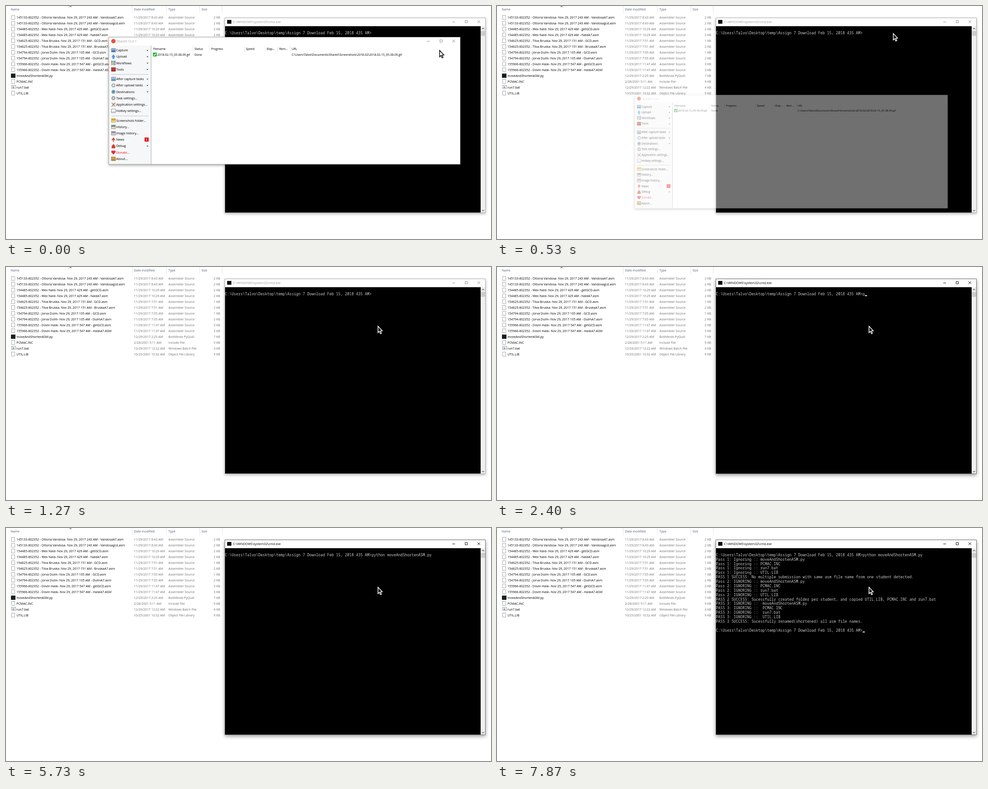
Animation of 1078 by 519 pixels, one loop 8 s. Source, as an HTML page with a canvas:

```html
<!DOCTYPE html>
<html lang="en">
<head>
<meta charset="utf-8">
<title>Console run</title>
<style>
html, body { margin: 0; width: 100%; height: 100%; overflow: hidden; background: #fff; }
canvas { display: block; }
</style>
</head>
<body>
<canvas id="stage" width="1078" height="519"></canvas>
<script>
const W = 1078, H = 519, LOOP = 8000, TICK = 200 / 3;
const UI = '"Open Sans", "Noto Sans", sans-serif';
const MONO = '"Noto Sans Mono", "DejaVu Sans Mono", monospace';
const stage = document.getElementById('stage').getContext('2d');
const clamp = v => Math.max(0, Math.min(1, v));

// Drawing helpers

// Text is set large and scaled down so that advances stay fractional.
function text(g, s, x, y, { size = 6.95, color = '#000', font = UI, align = 'left' } = {}) {
  g.save();
  g.translate(x, y);
  g.scale(size / 100, size / 100);
  g.font = `100px ${font}`;
  g.textAlign = align;
  g.fillStyle = color;
  g.fillText(s, 0, 0);
  g.restore();
}

function box(g, color, x, y, w, h) {
  g.fillStyle = color;
  g.fillRect(x, y, w, h);
}

function frame(g, color, x, y, w, h, width = .9) {
  g.strokeStyle = color;
  g.lineWidth = width;
  g.strokeRect(x, y, w, h);
}

function trace(g, pts) {
  g.beginPath();
  for (let i = 0; i < pts.length; i += 2) g.lineTo(pts[i], pts[i + 1]);
}

function poly(g, color, ...pts) {
  trace(g, pts);
  g.fillStyle = color;
  g.fill();
}

function line(g, color, width, ...pts) {
  trace(g, pts);
  g.strokeStyle = color;
  g.lineWidth = width;
  g.stroke();
}

function disc(g, color, x, y, r) {
  g.beginPath();
  g.arc(x, y, r, 0, Math.PI * 2);
  g.fillStyle = color;
  g.fill();
}

function chevron(g, color, x, y, dir) {
  line(g, color, 1.1, x - 2.4, y + dir, x, y - dir, x + 2.4, y + dir);
}

function panel(g, { x, y, w, h }, blur, shade, border) {
  g.save();
  g.shadowColor = `rgba(0,0,0,${shade})`;
  g.shadowBlur = blur;
  g.shadowOffsetY = blur / 3;
  box(g, '#fff', x, y, w, h);
  g.restore();
  frame(g, border, x + .5, y + .5, w - 1, h - 1, 1);
}

function captionButtons(g, x, y, color) {
  line(g, color, 1, x - 3, y + .5, x + 3, y + .5);
  frame(g, color, x + 25.5, y - 2.5, 5, 5);
  for (const d of [-3, 3]) line(g, color, .9, x + 56 - d, y - 3, x + 56 + d, y + 3);
}

// File list

const SCRIPT = 'moveAndShortenASM.py';
const SUBMISSIONS = `
145133|Ottoria Vandosa|243|8:43|VandosaA7.asm|2
145133|Ottoria Vandosa|243|8:43|Vandosagcd.asm|2
154485|Wex Nald|429|10:29|getGCD.asm|2
154485|Wex Nald|429|10:29|NaldA7.asm|2
154625|Tilva Bruska|151|7:51|GCD.asm|1
154625|Tilva Bruska|151|7:51|BruskaA7.asm|2
154794|Jorva Dulm|105|7:05|GCD.asm|1
154794|Jorva Dulm|105|7:05|DulmA7.asm|2
155966|Dovin Hask|547|11:47|getGCD.asm|3
155966|Dovin Hask|547|11:47|HaskA7.ASM|3`;
const TOOLS = `
${SCRIPT}|12/29/2017 2:25 AM|BoltMinds PyQuill|7
PCMAC.INC|2/28/2001 5:11 AM|Include File|9
run7.bat|12/29/2017 12:22 AM|Windows Batch File|4
UTIL.LIB|10/25/2001 10:32 AM|Object File Library|9`;
const rows = s => s.trim().split('\n').map(r => r.split('|'));
const FILES = rows(SUBMISSIONS).map(([id, name, stamp, time, file, size]) => [
  `${id}-602352 - ${name}- Nov 29, 2017 ${stamp} AM - ${file}`,
  `11/29/2017 ${time} AM`, 'Assembler Source', size
]).concat(rows(TOOLS));

function fileIcon(g, name, x, y) {
  if (name === SCRIPT) return box(g, '#15201c', x - 1.5, y, 10, 9.5);
  const bat = name === 'run7.bat';
  const w = bat ? 9 : 7, h = bat ? 7.5 : 9;
  box(g, bat ? '#eef2f5' : '#fff', x, y, w, h);
  frame(g, '#8f8f8f', x, y, w, h, .8);
  if (bat) disc(g, '#8fa3b4', x + 4, y + 4.5, 2);
}

function drawExplorer(g) {
  const head = { color: '#4c607a' }, dim = { color: '#6d6d6d' };
  const heads = { Name: 10.5, 'Date modified': 284.5, Type: 361, Size: 434.5 };
  for (const s in heads) text(g, s, heads[s], 10.4, head);
  for (const x of [280, 356, 430, 480]) box(g, '#e5e5e5', x, 0, 1, 16);
  chevron(g, '#777', 143.4, 1.4, 1);
  FILES.forEach(([name, date, type, size], i) => {
    const y = 25.7 + i * 12.95, base = y + 2.5;
    fileIcon(g, name, 12.5, y - 4.7);
    text(g, name, 23.3, base);
    text(g, date, 284.3, base, dim);
    text(g, type, 361, base, dim);
    text(g, size + ' KB', 476, base, { ...dim, align: 'right' });
  });
}

// Capture tool: menu icons live in a 10 by 10 cell

const card = (top, bottom, edge = '#7c8a96') => g => {
  box(g, top, .5, 1, 9, 4);
  box(g, bottom, .5, 5, 9, 4);
  frame(g, edge, .5, 1, 9, 8);
};
const peak = (color, stem) => g => {
  poly(g, color, 5, 0, 9.5, 6, .5, 6);
  box(g, color, 5 - stem, 6, stem * 2, 4);
};
const ring = (color, core) => g => {
  disc(g, color, 5, 5, 4.4);
  disc(g, core, 5, 5, 2.2);
};
const grid = g => {
  for (let i = 0; i < 9; i++)
    box(g, `hsl(${i * 120 % 360 + i * 5},55%,55%)`, i % 3 * 3.4, (i / 3 | 0) * 3.4, 2.7, 2.7);
};
const cross = g => {
  line(g, '#8a8a8a', 1.6, 1, 1, 9.5, 9.5);
  line(g, '#b25a4a', 1.6, 9, 1, 1, 9.5);
};
const heart = g => {
  for (const x of [2.8, 7.2]) disc(g, '#e0303a', x, 3.4, 2.6);
  poly(g, '#e0303a', .5, 4.6, 9.5, 4.6, 5, 9.8);
};

// A trailing ">" marks a submenu.
const MENU = [
  [['Capture>', card('#7db4e6', '#4a75a3')], ['Upload>', peak('#3f96dd', 2)],
    ['Workflows>', grid], ['Tools>', card('#c8362e', '#a82c26', '#7e2420')]],
  [['After capture tasks>', card('#9cc6ea', '#5e94c4')], ['After upload tasks>', ring('#9aa5ae', '#fff')],
    ['Destinations>', ring('#8fa0ae', '#3f8fd2')], ['Task settings...', ring('#999', '#ddd')],
    ['Application settings...', cross], ['Hotkey settings...', card('#fff', '#ddd')]],
  [['Screenshots folder...', card('#d9a938', '#f4d684', '#c99b33')],
    ['History...', card('#6d87a5', '#f0d9a0')], ['Image history...', card('#8a94ad', '#ecc7b8')],
    ['News', peak('#cf4a42', 1)], ['Debug>', peak('#d6402e', 4)],
    ['Donate...', heart], ['About...', card('#d8a33a', '#c08e38', '#8e6a2b')]]
];
const COLUMNS = {
  Filename: 327, Status: 419, Progress: 456, Speed: 533.3,
  'Elap...': 579.5, 'Rem...': 607.3, URL: 635
};
const APP = { x: 228, y: 69, w: 782, h: 284 };

function drawMenu(g) {
  let y = 98.6;
  const step = 14.22;
  MENU.forEach((group, i) => {
    if (i) {
      box(g, '#c2c4c6', 234, y - 3.5, 83, 1);
      y += step / 2;
    }
    for (const [label, icon] of group) {
      g.save();
      g.translate(233.8, y - 5);
      icon(g);
      g.restore();
      text(g, label.replace('>', ''), 245, y + 2.5, { size: 7, color: icon === heart ? '#e01020' : '#000' });
      if (label.endsWith('>')) poly(g, '#222', 312.5, y - .6, 316.5, y - .6, 314.5, y + 1.5);
      if (label === 'News') {
        box(g, '#e30613', 308, y - 4.7, 9, 9);
        text(g, '8', 312.5, y + 2.3, { color: '#fff', align: 'center' });
      }
      y += step;
    }
  });
}

function drawApp(g, leaving) {
  const small = { size: 6.5 }, shot = '2018-02-15_05-38-09.gif';
  panel(g, APP, 6, .35, leaving ? '#e4e4e4' : '#a8a8a8');
  disc(g, '#e2553f', 238.7, 78.3, 4.9);
  text(g, 'ShareX 12.0.1', 246.5, 80.9, { color: '#999' });
  if (!leaving) captionButtons(g, 939, 78, '#8c8c8c');

  box(g, '#f6f7f8', 229, 88, 93, 264);
  box(g, '#a5a8ab', 322, 88, 1, 264);
  drawMenu(g);

  for (const label in COLUMNS) {
    const x = COLUMNS[label];
    text(g, label, x, 97.7, small);
    if (label !== 'Filename') box(g, '#e3e3e3', x - 4, 89, 1, 13);
  }
  box(g, '#2fae3c', 326.5, 103.8, 8.8, 8.6);
  line(g, '#fff', 1.4, 328.3, 108, 330.2, 110, 333.6, 105.8);
  text(g, shot, 336.5, 110.5, small);
  text(g, 'Done', 419, 110.5, small);
  text(g, 'C:\\Users\\Talvo\\Documents\\ShareX\\Screenshots\\2018-02\\' + shot, 635, 110.5, small);
}

const layer = document.createElement('canvas').getContext('2d');
layer.canvas.width = W;
layer.canvas.height = H;

// Minimizing: shrink and drop with the square of time, fading out.
function drawMinimizing(g, n) {
  const p = .0123 * Math.max(0, n - 5) ** 2, mid = APP.x + APP.w / 2;
  const alpha = clamp((9.3 - n) / 2.95);
  if (!alpha) return;
  layer.save();
  layer.clearRect(0, 0, W, H);
  layer.translate(mid + p * 315, Math.round(APP.y + p * 1168));
  layer.scale(1 - p, 1 - p);
  layer.translate(-mid, -APP.y);
  drawApp(layer, p > 0);
  layer.restore();
  g.save();
  g.globalAlpha = alpha;
  g.drawImage(layer.canvas, 0, 0);
  g.restore();
}

// Console

const PROMPT = 'C:\\Users\\Talvo\\Desktop\\temp\\Assign 7 Download Feb 15, 2018 435 AM>';
const ignored = prefix => [SCRIPT, 'PCMAC.INC', 'run7.bat', 'UTIL.LIB'].map(f => prefix + f);
const OUTPUT = [
  ...ignored('Pass 1: Ignoring :: '),
  'PASS 1 SUCCESS: No multiple submission with same asm file name from one student detected.',
  ...ignored('Pass 2: IGNORING :: '),
  'PASS 2 SUCCESS: Sucessfully created folder per student, and copied UTIL.LIB, PCMAC.INC and run7.bat',
  ...ignored('PASS 3: IGNORING ::  '),
  'PASS 3 SUCCESS: Sucessfully renamed(shortened) all asm file names.',
  '', PROMPT
];
const FOCUS = 22, ENTER = 87, DONE = 95, BLINK = 8;

// Bursts of typing; the last one is a tab completion.
const KEYS = [
  { s: 'python ', at: 36, span: 15 },
  { s: 'mov', at: 66, span: 2 },
  { s: SCRIPT.slice(3), at: 73, span: 0 }
].flatMap(({ s, at, span }) => [...s].map((ch, i) =>
  ({ ch, at: Math.round(at + span * (i / (s.length - 1)) ** .7) })));
const CARET_OFF = [30, 46, 54, 70, 86, 110];

// Lines appear in two spurts, one for each round of file work.
function printed(n) {
  if (n < 89) return 0;
  if (n < 93) return Math.min(11, 9 + 2 * (n - 89));
  return Math.min(OUTPUT.length, 14 + Math.floor(1.5 * (n - 93)));
}

function caretShown(n, lastKey) {
  if (n < FOCUS || n >= ENTER && n <= DONE) return false;
  return !CARET_OFF.some(off => n >= off && n < off + BLINK && lastKey < off);
}

function drawConsole(g, n) {
  const cell = 4.94, row = 9.87, left = 486.6, base = 62.8;
  const active = n >= FOCUS, running = n >= ENTER && n < DONE;
  const ink = { size: cell / .6, color: '#ccc', font: MONO };
  const win = { x: 486, y: 26, w: 580, h: 435 };

  panel(g, win, active ? 8 : 6, active ? .4 : .3, active ? '#6e6e6e' : '#b0b0b0');
  box(g, '#0c0c0c', 491.5, 31, 9.5, 8.5);
  const title = 'C:\\WINDOWS\\system32\\cmd.exe' + (running ? ' - python  ' + SCRIPT : '');
  text(g, title, 504.6, 38, { color: active ? '#000' : '#999' });
  captionButtons(g, 995, 35, active ? '#000' : '#8c8c8c');

  box(g, '#000', 487, 45, 568, 415);
  box(g, '#f0f0f0', 1055, 45, 10, 415);
  box(g, '#cdcdcd', 1055.5, 55.5, 9.5, 11);
  chevron(g, '#444', 1060.4, 50.4, 1.2);
  chevron(g, '#444', 1060.4, 455.6, -1.2);

  const pressed = KEYS.filter(k => k.at <= n);
  const typed = pressed.map(k => k.ch).join('');
  const lines = [PROMPT + typed, ...OUTPUT.slice(0, printed(n))];
  lines.forEach((s, i) => text(g, s, left, base + i * row, ink));
  if (caretShown(n, pressed.length ? pressed.at(-1).at : 0)) {
    const last = lines.length - 1;
    box(g, '#f2f2f2', left + lines[last].length * cell, base + last * row, cell, 2);
  }
}

// Pointer: eased moves between rest points

const MOVES = [
  { from: 0, to: 5, x: 942, y: 77, power: 1 },
  { from: 7, to: 12, x: 815, y: 43, power: 3 },
  { from: 15, to: 19, x: 826, y: 131, power: 1 }
];

function drawPointer(g, n) {
  let x = 963, y = 98;
  for (const m of MOVES) {
    const k = 1 - (1 - clamp((n - m.from) / (m.to - m.from))) ** m.power;
    x += (m.x - x) * k;
    y += (m.y - y) * k;
  }
  g.save();
  g.translate(x, y);
  // The outline inverts whatever lies beneath it.
  g.globalCompositeOperation = 'difference';
  trace(g, [.8, 1, .8, 15.2, 3.9, 12.3, 6.2, 17.6, 8.5, 16.6, 6.2, 11.5, 10.3, 11.2]);
  g.closePath();
  g.strokeStyle = '#fff';
  g.lineWidth = 1.5;
  g.stroke();
  g.restore();
}

function draw(ms) {
  const n = Math.floor((ms % LOOP + 4) / TICK) % 120;
  box(stage, '#fff', 0, 0, W, H);
  drawExplorer(stage);
  drawConsole(stage, n);
  drawMinimizing(stage, n);
  drawPointer(stage, n);
}

const start = performance.now();
function loop() {
  draw(performance.now() - start);
  requestAnimationFrame(loop);
}
loop();
</script>
</body>
</html>
```
